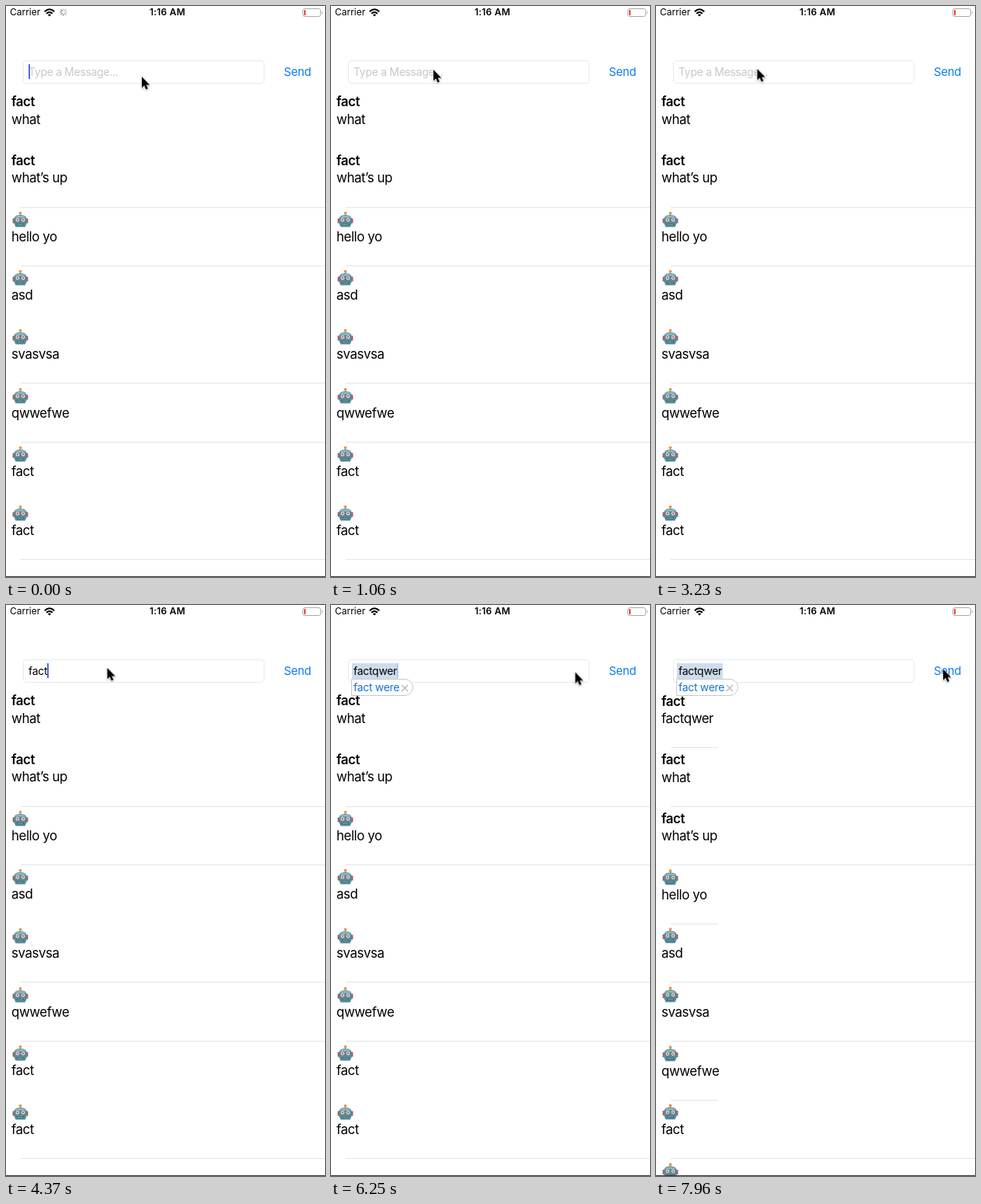
These frames come from a looping animation (411x735 px, 8000 ms). An HTML page:

```html
<!DOCTYPE html>
<html lang="en">
<head>
<meta charset="utf-8">
<title>Chat</title>
<style>
  html, body { margin: 0; width: 100%; height: 100%; overflow: hidden; background: #fff; }
  #stage {
    position: relative; width: 411px; height: 735px; overflow: hidden; background: #fff;
    color: #000; font: 16.9px/20px Inter, sans-serif; white-space: pre;
  }
  #stage > *, .row > *, .row { position: absolute; }
  .status { top: -1.6px; font-size: 12px; }
  .small { font-size: 13.9px; letter-spacing: -.018em; }
  svg { overflow: visible; }

  #list { top: 113.5px; left: 7px; letter-spacing: -.026em; }
  .row b { font-weight: 600; }
  .row svg { left: 1px; top: -.5px; width: 21px; height: 21px; }
  .row p { margin: 0; top: 22.5px; }
  .line { left: 19px; height: 1px; background: #e4e4e6; }

  #field {
    left: 22px; top: 70px; width: 309px; height: 28px;
    border: 1px solid #e9e9e9; border-radius: 4px;
  }
  #hint { left: 29px; top: 74.5px; color: #c7c7cd; }
  #typed { left: 29px; top: 74.5px; height: 20px; }
  #mark { position: absolute; inset: .5px -1px -.5px -2px; background: #cddded; }
  #letters { position: relative; }
  #caret {
    position: absolute; right: -2px; top: .5px; width: 2px; height: 19px; background: #4a6ee0;
  }
  #popup {
    left: 26px; top: 95px; height: 20px; padding: 0 6px 0 2px; background: #fff;
    border: 1px solid #c9c9c9; border-radius: 0 11px 11px 0; color: #1b71d8;
  }
  #popup svg { width: 8px; height: 8px; margin-left: 3px; }
  #send { left: 358px; top: 75px; font-size: 14.9px; letter-spacing: -.02em; color: #0a7cf5; }
  #edge { left: 0; top: 734px; width: 411px; height: 1px; background: #3a3a3a; }
  #pointer { left: 0; top: 0; filter: drop-shadow(0 1px 1px #0005); }
</style>
</head>
<body>
<div id="stage">
  <svg width="0" height="0">
    <symbol id="robot" viewBox="0 0 21 21">
      <path d="M10.5 2v4" stroke="#8a8f92" stroke-width="1.6"/>
      <circle cx="10.5" cy="2.2" r="1.9" fill="#e8983f"/>
      <path d="M.6 9h3v6h-3zM17.4 9h3v6h-3z" fill="#a9575a"/>
      <path d="M2.6 8.5Q3.5 4.6 10.5 4.6T18.4 8.5L18.8 15 16.6 20.2H4.4L2.2 15z" fill="#588d9b"/>
      <path d="M3.4 8Q5 5.4 10.5 5.4T17.6 8z" fill="#8fb9c3"/>
      <circle cx="6.9" cy="10.8" r="2.2" fill="#dfe9ea"/>
      <circle cx="14.1" cy="10.8" r="2.2" fill="#dfe9ea"/>
      <circle cx="6.9" cy="10.8" r="1.1" fill="#d8443c"/>
      <circle cx="14.1" cy="10.8" r="1.1" fill="#d8443c"/>
      <path d="M10.5 11.6l1.2 2.2H9.3z" fill="#c65149"/>
      <path d="M5.6 15.6h9.8l-.9 2.6h-8z" fill="#315f6c"/>
      <path d="M7 16.8h7" stroke="#cfe0e3" stroke-width="1.1" stroke-dasharray="1.2 .7"/>
    </symbol>
  </svg>

  <div id="list"></div>

  <span class="status" style="left:5px">Carrier</span>
  <svg style="left:49px;top:3px" width="14" height="11" fill="none" stroke="#000" stroke-width="2">
    <path d="M.8 4.2Q7-1.8 13.2 4.2M3.2 6.8Q7 3 10.8 6.8"/>
    <path d="M7 10.6L4.9 8.4Q7 6.5 9.1 8.4z" fill="#000" stroke="none"/>
  </svg>
  <svg id="spinner" style="left:69px;top:3px" width="10" height="10" stroke="#555" stroke-width="1.2" stroke-linecap="round"></svg>
  <span class="status" style="left:185px;font-weight:600;letter-spacing:.018em">1:16 AM</span>
  <svg style="left:382px;top:3px" width="27" height="11">
    <rect x=".5" y=".5" width="23" height="10" rx="2.6" fill="none" stroke="#a8a8a8"/>
    <rect x="2" y="2" width="2" height="7" rx=".8" fill="#f03a30"/>
    <path d="M25 3.6q2 1.9 0 3.8z" fill="#a8a8a8"/>
  </svg>

  <div id="field"></div>
  <span id="hint" class="small">Type a Message...</span>
  <div id="typed" class="small"><i id="mark"></i><span id="letters"></span><i id="caret"></i></div>
  <div id="popup" class="small">fact were<svg viewBox="0 0 8 8" stroke="#b5b5b5" stroke-width="1.2"><path d="M0 0L8 8M8 0L0 8"/></svg></div>
  <span id="send">Send</span>
  <div id="edge"></div>
  <svg id="pointer" width="12" height="18">
    <path d="M0 0V14.2L3.2 11.3 5.4 16.4 7.9 15.3 5.7 10.4H10.2z" stroke="#fff" stroke-width="1.1" paint-order="stroke"/>
  </svg>
</div>

<script>
const LOOP = 8000, PITCH = 75.6, POSTED = 7900;
const $ = id => document.getElementById(id);

// points: [ms, value]; the last value holds until the loop restarts
function animate(el, prop, points, easing = 'linear') {
  const frames = [...points, [LOOP, points.at(-1)[1]]]
    .map(([ms, value]) => ({ offset: ms / LOOP, [prop]: value, easing }));
  el.animate(frames, { duration: LOOP, iterations: Infinity });
}
const step = (el, prop, points) => animate(el, prop, points, 'step-end');
const showAt = (el, ms) => step(el, 'opacity', [[0, 0], [ms, 1]]);

// Messages: the first one is posted late and pushes the others down
const robot = '<svg><use href="#robot"/></svg>', user = '<b>fact</b>';
const messages = ['factqwer', 'what', 'what’s up', 'hello yo', 'asd', 'svasvsa', 'qwwefwe', 'fact', 'fact'];
$('list').innerHTML = messages.map((text, i) =>
  `<div class="row" style="top:${i * PITCH}px">${i < 3 ? user : robot}<p>${text}</p></div>`).join('');
showAt($('list').firstChild, POSTED);
step($('list'), 'transform', [[0, `translateY(${-PITCH}px)`], [POSTED, 'none']]);

for (let i = 0; i < 8; i++) {
  const line = document.createElement('div'), late = i % 3 === 0;
  line.className = 'line';
  line.style.top = Math.round(183 + i * PITCH) + 'px';
  line.style.width = late ? '61px' : '392px';
  $('list').before(line);
  if (late) showAt(line, POSTED);
}

// Typing
const keyTimes = [3930, 4030, 4220, 4370, 4930, 5080, 5260, 5410];
[...'factqwer'].forEach((char, i) => {
  const letter = document.createElement('span');
  letter.textContent = char;
  $('letters').append(letter);
  step(letter, 'fontSize', [[0, '0px'], [keyTimes[i], '13.9px']]);
});
step($('hint'), 'opacity', [[0, 1], [keyTimes[0], 0]]);
showAt($('mark'), 5610);
showAt($('popup'), 5610);
animate($('caret'), 'opacity', [
  [0, 1], [500, 1], [640, 0], [1270, 0], [1380, 1], [2760, 1], [2900, 0], [3230, 0], [3280, 1],
  [6150, 1], [6290, 0], [6850, 0], [7080, 1], [7380, 1], [7440, 0]]);

// Network spinner: short bursts
$('spinner').innerHTML = Array.from({ length: 8 }, (_, i) =>
  `<path d="M5 2.6V.6" opacity="${.35 + i * .08}" transform="rotate(${i * 45} 5 5)"/>`).join('');
const bursts = [[0, 130], [890, 1060], [1830, 2020], [2760, 2960], [3760, 3960],
  [4790, 4990], [5700, 5900], [6850, 7050], [7680, POSTED]];
step($('spinner'), 'opacity', bursts.flatMap(([on, off]) => [[on, 1], [off, 0]]));
$('spinner').animate({ transform: ['rotate(0deg)', 'rotate(360deg)'] },
  { duration: 800, iterations: Infinity, easing: 'steps(8)' });

// Pointer and button press
const path = [[0, 175, 91], [60, 175, 91], [150, 190, 108], [240, 150, 118], [360, 50, 112], [430, 17, 95],
  [540, 85, 68], [660, 137, 60], [840, 138, 62], [890, 137, 66], [1060, 132, 82], [1270, 132, 82],
  [1380, 130.5, 81], [5800, 130.5, 81], [6080, 250, 86], [6360, 356, 87], [6600, 370, 82.5]];
animate($('pointer'), 'transform', path.map(([ms, x, y]) => [ms, `translate(${x}px, ${y}px)`]));
animate($('send'), 'opacity', [[0, 1], [6740, 1], [6800, .3], [6840, .3], [7120, 1]]);
</script>
</body>
</html>
```
